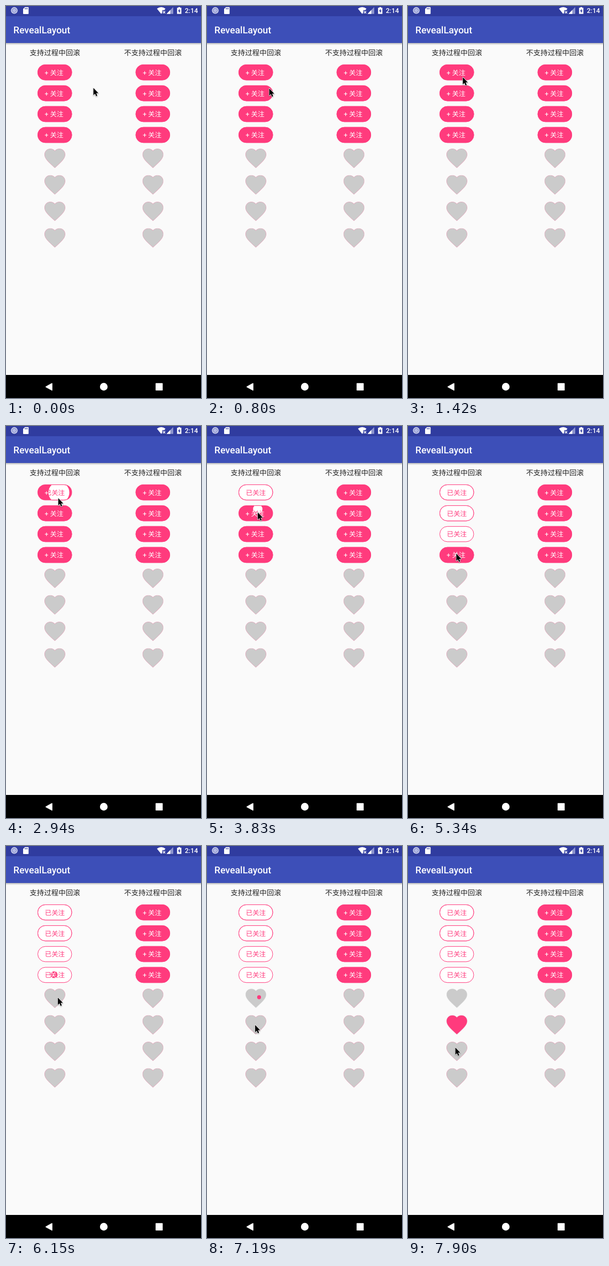
Write an HTML page with a canvas that moves like this. It is 365 px wide and 731 px high and loops after 7.99 s.

```html
<!DOCTYPE html>
<html lang="zh-CN">
<head>
<meta charset="utf-8">
<title>RevealLayout</title>
<style>
html, body { margin: 0; height: 100%; overflow: hidden; background: #fafafa; }
canvas { display: block; }
</style>
</head>
<body>
<canvas id="stage" width="365" height="731"></canvas>
<script>
const g = document.getElementById('stage').getContext('2d');
g.textRendering = 'geometricPrecision';
const LOOP = 7990, STEP = 88.7;
const REVEAL = 500 / STEP;          // length of one reveal, in steps
const PINK = '#ff3b7d', GREY = '#cbcbcb', PAGE = '#fafafa', BAR = '#303c9f';
const FONT = 'px Roboto, "Noto Sans CJK SC", "Noto Sans CJK", sans-serif';
const ZOOM = 1.9;
const HEART = new Path2D('M12 21.35l-1.45-1.32C5.4 15.36 2 12.28 2 8.5 2 5.42 4.42 3 7.5 3c1.74 0 3.41.81 4.5 2.09C13.09 3.81 14.76 3 16.5 3 19.58 3 22 5.42 22 8.5c0 3.78-3.4 6.86-8.55 11.54L12 21.35z');
const ARROW = new Path2D('M.6.8V14.2L3.7 11.4 5.7 16.2 7.9 15.3 5.9 10.6H10Z');

// taps on the left column, times in steps
const taps = [
  { row: 0, at: 30.33, x: 99, y: 124 },
  { row: 1, at: 41.3, x: 95, y: 155 },
  { row: 2, at: 50.65, x: 94.5, y: 202 },
  { row: 3, at: 64.9, x: 90, y: 240 },
  { row: 4, at: 69.6, x: 97, y: 282 },
  { row: 4, at: 76.5, x: 97.5, y: 282 },
  { row: 5, at: 81.4, x: 90, y: 333 }
];

// the pointer rests around each stop's time and glides between stops
const stops = [
  { at: 0.6, x: 163.5, y: 152 }, { at: 13, x: 114, y: 153 },
  { at: 18, x: 102.5, y: 132 }, { at: 24, x: 101, y: 142 },
  ...taps, { at: 91, x: 88.5, y: 375 }
];
const BEFORE = 2, AFTER = 1.35;

const clamp = p => Math.min(1, Math.max(0, p));
const ease = p => 0.5 - Math.cos(Math.PI * clamp(p)) / 2;
const easeOut = p => 1 - (1 - clamp(p)) ** 2;

function rect(color, x, y, w, h) {
  g.fillStyle = color;
  g.fillRect(x, y, w, h);
}

function text(str, x, y, size, color, align = 'left', weight = 400) {
  g.font = weight + ' ' + size + FONT;
  g.textAlign = align;
  g.fillStyle = color;
  g.fillText(str, x, y);
}

function disc(color, x, y, r) {
  g.fillStyle = color;
  g.beginPath();
  g.arc(x, y, r, 0, 7);
  g.fill();
}

function shape(color, d) {
  g.fillStyle = color;
  g.fill(new Path2D(d));
}

// bounds of the view in a row
const view = (row, mid) => row < 4
  ? { x: mid - 32.25, y: 109 + row * 38.9, w: 64.5, h: 29.5 }
  : { x: mid - 12 * ZOOM + 0.2, y: 260.9 + (row - 4) * 49.45, w: 24 * ZOOM, h: 24 * ZOOM };

function heart(v, color) {
  g.save();
  g.translate(v.x, v.y);
  g.scale(ZOOM, ZOOM);
  g.fillStyle = g.strokeStyle = color;
  g.fill(HEART);
  g.globalAlpha = 0.3;    // soft rim
  g.lineWidth = 0.6;
  g.stroke(HEART);
  g.restore();
}

function button(v, on) {
  const inset = on ? 0.5 : 0, base = v.y + 19.6;
  g.beginPath();
  g.roundRect(v.x + inset, v.y + inset, v.w - 2 * inset, v.h - 2 * inset, v.h / 2 - inset);
  g.fillStyle = on ? '#fff' : PINK;
  g.fill();
  if (on) {
    g.strokeStyle = PINK;
    g.lineWidth = 1;
    g.stroke();
    text('已关注', v.x + 32.4, base, 12.44, PINK, 'center');
  } else {
    text('+ 关注', v.x + 13.3, base, 12.44, '#fff');
  }
}

function item(row, mid, done, n) {
  const v = view(row, mid);
  const face = on => row < 4 ? button(v, on) : heart(v, on ? PINK : GREY);
  const tap = done.at(-1);
  if (!tap) {
    face(true);
    face(false);
    return;
  }
  const on = done.length % 2 === 1;
  const grow = on && row % 4 < 2;     // otherwise the old face shrinks away
  const top = grow ? on : !on;
  const p = ease((n - tap.at) / REVEAL);
  const reach = Math.hypot(Math.max(tap.x - v.x, v.x + v.w - tap.x),
                           Math.max(tap.y - v.y, v.y + v.h - tap.y));
  face(!top);
  g.save();
  g.beginPath();
  g.arc(tap.x, tap.y, reach * (grow ? p : 1 - p), 0, 7);
  g.clip();
  face(top);
  g.restore();
}

function statusBar() {
  rect(BAR, 0, 0, 365, 19);
  disc('#d3d7f0', 15.5, 8.3, 6.2);
  disc('#7f88c8', 15.5, 8.3, 4.6);
  disc('#b4bbe4', 15.5, 8.3, 3.4);
  shape('#fff', 'M35.5 2H41.2Q42.3 2 42.3 3.1V13.8Q42.3 15 41.2 15H33.2Q32 15 32 13.8V5.5Z');
  for (let i = 0; i < 3; i++) rect(BAR, 35.2 + i * 2.1, 3.6, 1.1, 2.6);
  shape('#fff', 'M282.5 5Q290.5-.8 298.5 5L296.3 7.8H292.5V12.4L290.5 14.8Z');
  g.strokeStyle = '#fff';
  g.lineWidth = 1.3;
  g.stroke(new Path2D('M293.8 9.4L298 13.8M298 9.4L293.8 13.8'));
  shape('#8d95cd', 'M313 2V14.7H300.5Z');
  shape('#fff', 'M307.5 7.6V14.7H300.5Z');
  shape('#fff', 'M322.6 2H325.8V3.3H328.3V14.8H320.2V3.3H322.6Z');
  shape(BAR, 'M325 5L322 9.8H323.8V13.2L326.8 8.4H325Z');
  text('2:14', 334.8, 12.9, 12.44, '#fff', 'left', 500);
}

function navBar() {
  rect('#000', 0, 688, 365, 43);
  g.lineJoin = 'round';
  g.lineWidth = 1.6;
  g.strokeStyle = '#fff';
  for (const d of ['M74.8 710.2L86 704V716.4Z', 'M280.8 704H292.5V716.2H280.8Z']) {
    shape('#fff', d);
    g.stroke(new Path2D(d));
  }
  disc('#fff', 183, 710, 7.2);
}

function chrome() {
  rect(PAGE, 0, 0, 365, 731);
  const shade = g.createLinearGradient(0, 69, 0, 73);
  shade.addColorStop(0, 'rgba(0,0,0,.26)');
  shade.addColorStop(1, 'rgba(0,0,0,0)');
  rect(shade, 0, 69, 365, 4);
  rect('#3d4fb8', 0, 19, 365, 50);
  statusBar();
  text('RevealLayout', 13.8, 51, 17.76, '#fff', 'left', 500);
  text('支持过程中回滚', 91.5, 91.8, 13.5, '#222', 'center');
  text('不支持过程中回滚', 275, 91.8, 13.5, '#222', 'center');
  navBar();
}

function pointer(n) {
  const i = stops.findIndex(s => s.at + AFTER > n);
  const b = stops[i], a = stops[i - 1] || b;
  const leave = a.at + AFTER;
  const p = a === b ? 0 : easeOut((n - leave) / (b.at - BEFORE - leave));
  g.save();
  g.translate(a.x + (b.x - a.x) * p - 0.5, a.y + (b.y - a.y) * p);
  g.lineJoin = 'round';
  g.lineWidth = 1.4;
  g.strokeStyle = '#fff';
  g.shadowColor = 'rgba(0,0,0,.35)';
  g.shadowBlur = 2;
  g.shadowOffsetY = 1;
  g.stroke(ARROW);
  g.shadowColor = 'transparent';
  g.fillStyle = '#000';
  g.fill(ARROW);
  g.restore();
}

function draw() {
  const n = Math.floor(performance.now() % LOOP / STEP);
  chrome();
  for (let row = 0; row < 8; row++) {
    item(row, 91.25, taps.filter(t => t.row === row && t.at < n), n);
    item(row, 274.85, [], n);
  }
  pointer(n);
  requestAnimationFrame(draw);
}
draw();
</script>
</body>
</html>
```
